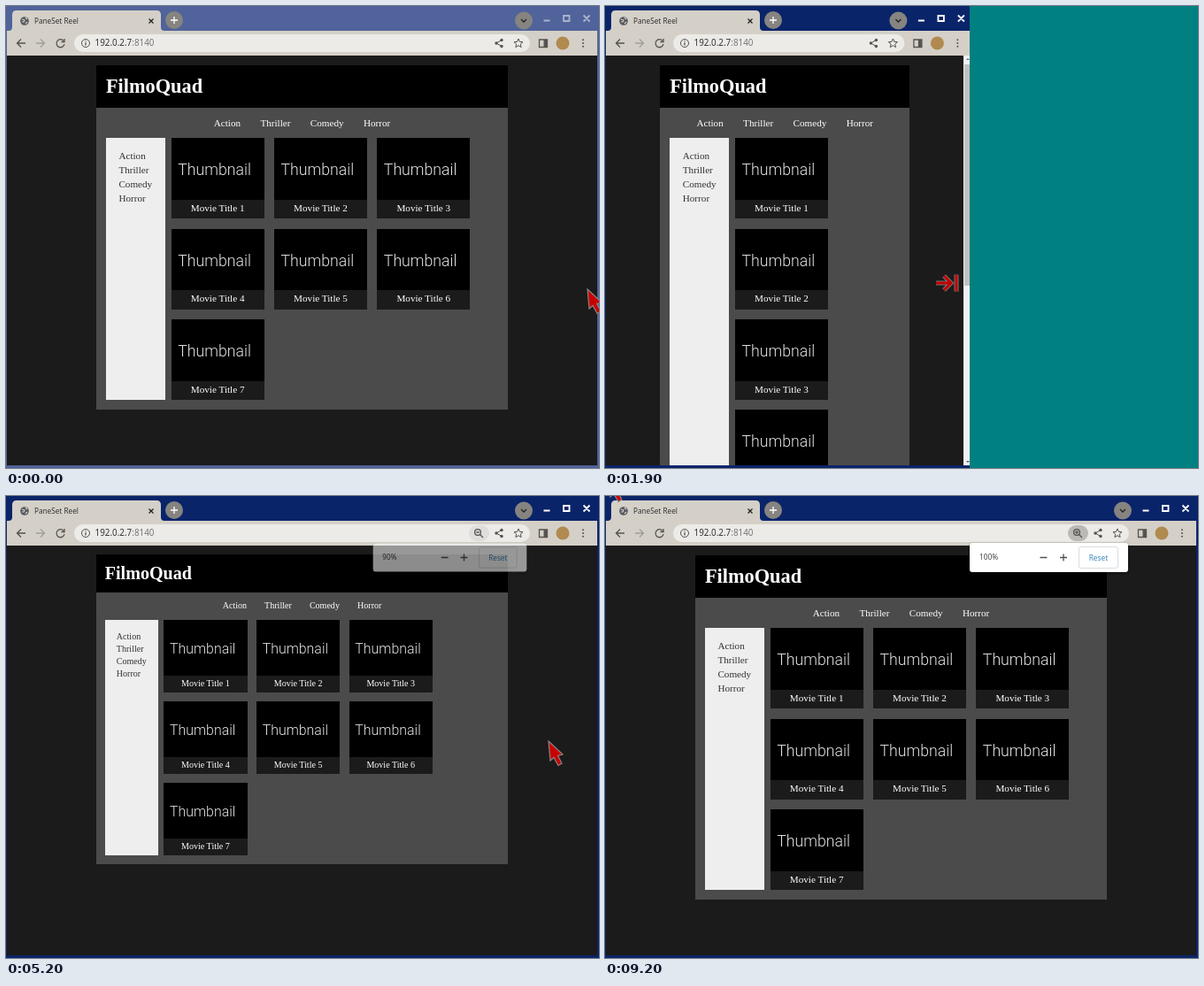
An HTML page that plays this animation: 670 px wide and 522 px high, repeating every 9.4 s.

```html
<!DOCTYPE html>
<html lang="en">
<head>
<meta charset="utf-8">
<title>Responsive page demo</title>
<style>
html, body { margin: 0; width: 100%; height: 100%; overflow: hidden; background: #008080; }
#stage { position: relative; width: 670px; height: 522px; overflow: hidden; background: #008080; }
#win { position: absolute; left: 0; top: 0; height: 522px; overflow: hidden; --bar: #0a246a; --ctl: #fff; }
#win.idle { --bar: #50639a; --ctl: #a9b3cd; }
#frame { position: absolute; left: 0; top: 0; height: 522px; background: var(--bar); }
#fill { position: absolute; left: 1px; right: 2px; top: 56px; bottom: 3px; background: #1b1b1b; }
svg { position: absolute; left: 0; top: 0; overflow: visible; }
svg text { font-family: "Noto Sans", sans-serif; }
.ln { fill: none; stroke: #55524f; stroke-width: 1.3; }
.ctl { fill: none; stroke: var(--ctl); stroke-width: 1.8; }

#pane { position: absolute; left: 1px; top: 56px; height: 463px; overflow: hidden; background: #1b1b1b; }
#view { font: 11.17px "Liberation Serif", serif; color: #fff; }
#box { position: relative; top: 1em; width: 69.8%; max-width: 75em; margin: 0 auto; background: #4b4b4b; }
header { height: 4.3em; background: #000; }
h1 { margin: 0; padding-left: .5em; font-size: 2em; line-height: 2.15em; }
nav { display: flex; justify-content: center; gap: 2em; height: 3.05em; line-height: 3.05em; }
#cols { display: flex; padding: 0 1em 1em; }
aside { flex: none; box-sizing: border-box; width: 6em; margin-right: .1em; padding: 1.16em 0 0 1.3em;
  background: #eee; color: #333; line-height: 1.415em; }
#list { display: flex; flex-wrap: wrap; flex: 1; row-gap: 1.015em; align-content: flex-start; }
.card { width: 9.375em; margin: 0 .52em; background: #1b1b1b; text-align: center; line-height: 1.7em; height: 8.15em; }
.pic { height: 6.25em; background: #000; text-align: left; }
.pic span { display: block; padding-left: .42em; font: 300 1.585em/4.15em Roboto, sans-serif; color: #e4e4e4; }

#bar { position: absolute; right: 0; top: 0; width: 10.5px; height: 463px; background: #f1f1f1; }
#thumb { position: absolute; left: 1px; right: 1px; top: 10px; background: #c1c1c1; }
#bar::before, #bar::after { content: ""; position: absolute; left: 2.5px; border: 2.7px solid transparent; }
#bar::before { top: 1px; border-bottom-color: #777; }
#bar::after { bottom: 1px; border-top-color: #555; }
#pop { position: absolute; left: 412px; top: 53px; width: 179px; height: 33px; border-radius: 3px; background: #fff;
  box-shadow: 0 1px 3px #0008; font: 8.4px/32px "Noto Sans", sans-serif; color: #444; }
#pct { position: absolute; left: 11px; }
#reset { position: absolute; left: 123px; top: 4px; width: 43px; height: 23px; border: 1px solid #dadce0;
  border-radius: 3px; line-height: 23px; text-align: center; color: #3c8ac0; }
</style>
</head>
<body>
<div id="stage">
  <div id="win">
    <div id="frame">
      <div id="fill"></div>
      <svg width="670" height="56">
        <rect id="tools" x="1" y="28" height="28" fill="#d4d0c8"/>
        <path d="M3 28q4 0 4-4V10q0-5 5-5H170q5 0 5 5V24q0 4 4 4Z" fill="#d4d0c8"/>
        <circle cx="21" cy="17" r="4.8" fill="#55595e"/>
        <path d="M18 15l3 1-1 2-2 0M22 13l2 2M22 20l2-2" fill="none" stroke="#d4d0c8" stroke-width="1.2"/>
        <text x="32" y="20" font-size="8.2" fill="#333">PaneSet Reel</text>
        <path d="M161.500 14.500l5 5m0-5l-5 5" class="ln" style="stroke:#222"/>
        <circle cx="190" cy="16" r="10" fill="#868481"/>
        <path d="M186 16h8m-4-4v8" class="ln" style="stroke:#fff"/>
        <path d="M22 42H12.500m4.500-4.500L12.500 42l4.500 4.500M62 37.500" class="ln"/>
        <path d="M34 42h9.500m-4.500-4.500l4.500 4.500-4.500 4.500" class="ln" style="stroke:#a19e98"/>
        <path d="M65 39.300a4.500 4.500 0 1 0 1 3.700M66 37v3.500h-3.500" class="ln"/>
        <rect id="omni" x="77" y="32" height="20" rx="10" fill="#ecebe8"/>
        <circle cx="90" cy="42" r="4.500" class="ln" style="stroke-width:1"/>
        <path d="M90 41.300v3.200m0-5.300v1.100" class="ln"/>
        <text x="100.500" y="45.400" font-size="9.870" fill="#333">192.0.2.7<tspan fill="#777">:8140</tspan></text>
        <g id="right">
          <circle cx="585" cy="16.500" r="10" fill="#868481"/>
          <path d="M582 15l3 3 3-3" class="ln" style="stroke:#222"/>
          <path d="M607.500 16.500h7M630 11h6.500v6H630ZM652.500 10.500l7 7m0-7l-7 7" class="ctl"/>
          <g id="lens">
            <rect x="523" y="33" width="23" height="18" rx="9" fill="#bbb9b6"/>
            <circle cx="533" cy="41" r="3.400" class="ln"/>
            <path d="M535.500 43.500l3.500 3.500M531.300 41h3.400" class="ln"/>
            <path id="plus" d="M533 39.300v3.400" class="ln"/>
          </g>
          <path d="M560 38.500l-6 3.500 6 3.500" class="ln" style="stroke-width:1"/>
          <g fill="#55524f"><circle cx="560" cy="38.500" r="1.700"/><circle cx="554" cy="42" r="1.700"/><circle cx="560" cy="45.500" r="1.700"/></g>
          <path d="M579 37l1.500 3.400 3.500.3-2.700 2.400.8 3.500-3.100-1.900-3.100 1.900.8-3.500-2.700-2.400 3.500-.3Z" class="ln" style="stroke-width:1"/>
          <path d="M602.500 38h9v8.500h-9Z" class="ln"/>
          <path d="M607.500 38h4v8.500h-4Z" fill="#55524f"/>
          <circle cx="629" cy="42" r="7.500" fill="#b08a4e"/>
          <g fill="#55524f"><circle cx="652" cy="38.300" r="1"/><circle cx="652" cy="42" r="1"/><circle cx="652" cy="45.700" r="1"/></g>
        </g>
      </svg>
    </div>
    <div id="pane">
      <div id="view">
        <div id="box">
          <header><h1>FilmoQuad</h1></header>
          <nav></nav>
          <div id="cols"><aside></aside><div id="list"></div></div>
        </div>
      </div>
      <div id="bar"><div id="thumb"></div></div>
    </div>
  </div>
  <div id="pop">
    <span id="pct"></span>
    <svg width="179" height="33"><path d="M79.500 16.500h8M102 16.500h8m-4-4v8" class="ln"/></svg>
    <div id="reset">Reset</div>
  </div>
  <svg width="670" height="522">
    <path id="arrow" d="M0 0L2 22 6 18.500 11 27.500 15 25 10.500 16.500 16 15Z" fill="#c80000" stroke="#8d8585" stroke-width="1.200"/>
    <g id="sizer" fill="none">
      <path id="grip" d="M0 0H17M9-8l8 8-8 8M23-9.500V9.500" stroke="#777" stroke-width="5"/>
      <path d="M0 0H17M9-8l8 8-8 8M23-9.500V9.500" stroke="#c00000" stroke-width="3"/>
    </g>
  </svg>
</div>
<script>
const $ = id => document.getElementById(id);
const LOOP = 9400, STEP = 100, VIEW_H = 463, EM = 11.17;

const genres = ["Action", "Thriller", "Comedy", "Horror"];
const links = genres.map(g => `<div>${g}</div>`).join("");
document.querySelector("nav").innerHTML = links;
document.querySelector("aside").innerHTML = links;
$("list").innerHTML = Array.from({ length: 7 }, (_, i) =>
  `<div class="card"><div class="pic"><span>Thumbnail</span></div>Movie Title ${i + 1}</div>`).join("");

// Rows are [time, value, ...]
const widths = [[400, 670], [500, 664], [800, 629], [1400, 522], [1900, 412], [2300, 374], [2600, 374],
  [2700, 382], [2900, 421], [3600, 665], [3700, 668], [4100, 668], [4200, 670]];
const gripPath = [[100, 653, 333], [400, 653, 333], [500, 640, 330], [800, 592, 322], [1400, 487, 317],
  [1900, 374, 313], [2300, 350, 313], [2600, 350, 314], [2900, 402, 316], [3600, 647, 322], [3700, 652, 323]];
const arrowPath = [[4200, 657, 320], [4400, 657, 320], [5000, 613, 277], [7900, 613, 277], [8000, 617, 277],
  [8100, 619, 277], [8200, 619, 277], [8600, 485, 60], [9100, 14, -14], [9200, 4, -21]];
const zooms = [[0, 100], [5200, 90], [5400, 80], [5500, 75], [5600, 67], [5800, 50], [6000, 33],
  [6800, 50], [6900, 67], [7100, 75], [7300, 80], [7500, 90], [8000, 100]];

function lerpAt(rows, t, k = 1) {
  const i = rows.findIndex(r => r[0] > t);
  if (i === 0) return rows[0][k];
  if (i < 0) return rows[rows.length - 1][k];
  const a = rows[i - 1], b = rows[i];
  return a[k] + (b[k] - a[k]) * (t - a[0]) / (b[0] - a[0]);
}
const holdAt = (rows, t) => rows.filter(r => r[0] <= t).pop()[1];
const show = (el, on) => { el.style.visibility = on ? "visible" : "hidden"; };
const move = (el, x, y) => el.setAttribute("transform", `translate(${x} ${y})`);

function layoutPage(right, zoom) {
  const full = right - 1, em = EM * zoom;
  $("pane").style.width = full + "px";
  $("view").style.fontSize = em + "px";
  $("view").style.width = full + "px";
  const height = () => $("box").offsetHeight + 2 * em;
  const scrolls = height() > VIEW_H;
  show($("bar"), scrolls);
  if (scrolls) {
    $("view").style.width = full - 10.5 + "px";
    $("thumb").style.height = (VIEW_H - 20) * VIEW_H / height() + "px";
  }
}

function draw(t) {
  const w = lerpAt(widths, t);
  const outer = Math.max(w, lerpAt(widths, t - 20));
  $("win").style.width = w + "px";
  $("win").className = t < 500 ? "idle" : "";
  $("frame").style.width = outer + "px";
  $("tools").setAttribute("width", outer - 3);
  $("omni").setAttribute("width", outer - 155);
  move($("right"), outer - 670, 0);

  const zoom = holdAt(zooms, t);
  layoutPage(lerpAt(widths, t - 27) - 2, zoom / 100);

  const fading = t < 5300;
  show($("pop"), t >= 5200);
  show($("lens"), t >= 5200);
  show($("plus"), t >= 8000);
  $("pop").style.opacity = fading ? .55 : 1;
  $("pop").style.transform = fading ? "scale(.97)" : "none";
  $("lens").firstElementChild.style.opacity = fading ? .25 : 1;
  $("pct").textContent = zoom + "%";

  const sizing = t >= 100 && t < 4200;
  show($("sizer"), sizing);
  show($("arrow"), !sizing && (t < 8700 || t >= 9100));
  if (sizing) move($("sizer"), lerpAt(gripPath, t), lerpAt(gripPath, t, 2));
  else move($("arrow"), lerpAt(arrowPath, t), lerpAt(arrowPath, t, 2));
}

const start = performance.now();
let last = -1;
function tick() {
  const t = Math.floor((performance.now() - start) % LOOP / STEP) * STEP;
  if (t !== last) draw(last = t);
  requestAnimationFrame(tick);
}
tick();
</script>
</body>
</html>
```
